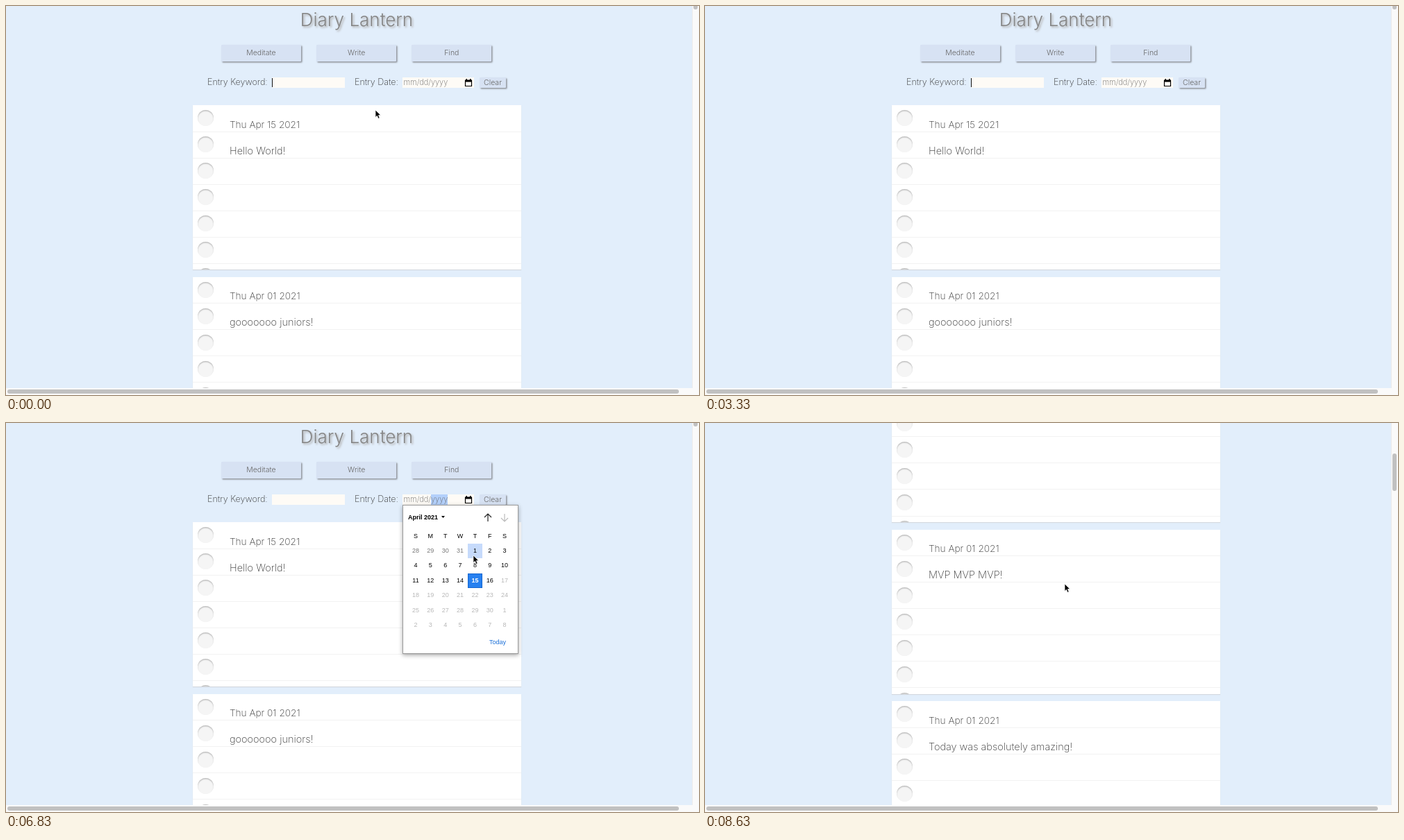
An HTML page that plays this animation: 998 px wide and 561 px high, repeating every 8680 ms.

```html
<!DOCTYPE html>
<html lang="en">
<head>
<meta charset="utf-8">
<title>Diary Lantern</title>
<style>
html, body { margin: 0; width: 100%; height: 100%; overflow: hidden; }
body { position: relative; background: #fafafa; font: 200 14.5px/20px Inter, "Open Sans", sans-serif; color: #333; }
div, svg { position: absolute; box-sizing: border-box; }
.t { white-space: pre; }
.mid { transform: translateX(-50%); }
#view { width: 988px; height: 551px; overflow: hidden; background: #e2eefb; }
#page { width: 988px; height: 2000px; }
.title { font-size: 26px; font-weight: 300; color: #858585; text-shadow: 2px 2px 3px #b0b0b0; }
.btn { background: #d7e2f3; border-radius: 1px; box-shadow: 1.5px 1.5px 2px #8b8f96; font-size: 10.5px; font-weight: 300; color: #666; text-align: center; }
.label { font-size: 12.6px; color: #333; }
.day { font-size: 13.7px; }
.field { background: #fefbf6; height: 15px; top: 103px; font-size: 10.5px; line-height: 15px; color: #666; white-space: pre; }
#date { font-size: 11px; }
#date span { display: inline-block; background: #b3d0fb; }
#caret { display: inline-block; width: 1px; height: 13px; margin-top: 1px; background: #111; vertical-align: top; }
.card { left: 269px; width: 473px; height: 237px; background: #fff; overflow: hidden; }
.shade { left: 269px; width: 473px; height: 237px; box-shadow: 0 1px 1px #d3d8df; }
.rule { width: 473px; height: 1px; background: #f2f2f2; }
.hole { left: 7px; width: 23px; height: 23px; border-radius: 50%; background: #f5f5f5; box-shadow: inset 0 1.5px 1.5px #bdbdbd; }
.bar { background: #c1c1c1; border-radius: 3px; }
#track { left: 988px; width: 10px; height: 551px; border-left: 1px solid #ececec; overflow: hidden; }
#picker { left: 571px; top: 118px; width: 167px; height: 215px; background: #fff; border: 1px solid #9a9a9a; box-shadow: 0 2px 6px #0005; font: 9px/20px "Liberation Sans", Arial, sans-serif; color: #000; }
.cell { width: 21.4px; height: 21.4px; line-height: 21.4px; text-align: center; }
.old { color: #777; }
.off { color: #b8b8b8; }
.today { background: #2680f0; outline: 1px solid #1667cf; outline-offset: -1px; color: #fff; font-weight: bold; }
.hover { background: #c6dafb; }
</style>
</head>
<body>
<div id="view">
  <div id="page"></div>
  <div id="picker">
    <svg width="165" height="40" fill="none" stroke-width="1.2">
      <path d="M55 15h5l-2.500 3z" fill="#000"/>
      <path d="M122 23v-11m-5 5l5-5l5 5" stroke="#222"/>
      <path d="M146 12v11m-5-5l5 5l5-5" stroke="#bbb"/>
    </svg>
  </div>
</div>
<div id="track"><div id="thumb" class="bar" style="left:1px;width:6px"></div></div>
<div class="bar" style="left:2px;top:553px;width:967px;height:6px"></div>
<svg id="cursor" width="16" height="20" stroke-linejoin="round" style="overflow:visible">
  <path id="arrow" d="M0 0v10.500l2.400-2.200l1.700 4l2-.8l-1.700-3.900h3.300z" fill="#000" stroke="#fff" stroke-width=".7"/>
  <path id="beam" d="M-2.500-7q2.500 0 2.500 1.500v11q0 1.500-2.500 1.500M2.500-7q-2.500 0-2.500 1.500M0 5.500q0 1.500 2.500 1.500" fill="none" stroke="#333"/>
  <path id="hand" d="M-1.500 6V1q0-1.200 1-1.200t1 1.200v3.200q1.700-.8 2.200.5q1.600-.5 2 .7q1.800-.3 1.800 1.300q0 3-1.500 5.300h-5q-1-2-3.200-4.300q-.9-1.400.3-1.600z" fill="#fff" stroke="#222"/>
</svg>
<script>
const LOOP = 8680, GAP = 247.8, ROW = 38.05;
const $ = id => document.getElementById(id);

function box(parent, cls, style, text = '') {
  const el = document.createElement('div');
  el.className = cls;
  for (const k in style) el.style[k] = typeof style[k] === 'number' ? style[k] + 'px' : style[k];
  el.textContent = text;
  parent.append(el);
  return el;
}
// Text whose capitals are centred on y
const write = (parent, x, y, text, cls = '') => box(parent, 't ' + cls, {left: x, top: y - 10}, text);

const page = $('page'), picker = $('picker');
write(page, 505, 19.5, 'Diary Lantern', 'title mid');
['Meditate', 'Write', 'Find'].forEach((name, i) =>
  box(page, 'btn', {left: 310 + 137.2 * i, top: 56, width: 115, height: 23.5, lineHeight: '24px'}, name));
write(page, 290, 110, 'Entry Keyword:', 'label');
write(page, 502, 110, 'Entry Date:', 'label');
const keyword = box(page, 'field', {left: 382.500, width: 105});
keyword.innerHTML = '<i id="word" style="font-style:normal"></i><i id="caret"></i>';
const date = box(page, 'field', {left: 571, width: 103, paddingLeft: 1.5});
date.id = 'date';
page.insertAdjacentHTML('beforeend', `<svg style="left:660px;top:105px" width="12" height="12">
  <path d="M1.500 2.500h9v8h-9z" fill="none" stroke="#000" stroke-width="1.200"/><path d="M1 1.500h10v3H1zM2.500 0h1.500v2H2.500zM8 0h1.500v2H8z"/></svg>`);
box(page, 'btn', {left: 682, top: 103, width: 38, height: 15, lineHeight: '16px'}, 'Clear');

function card(list, i, day, text) {
  const top = 143 + GAP * i;
  const wrap = box(list, '', {});
  box(wrap, 'shade', {top});
  const el = box(wrap, 'card', {top});
  for (let r = 0; r < 7; r++) {
    box(el, 'hole', {top: 7 + ROW * r});
    box(el, 'rule', {top: 37.500 + ROW * r});
  }
  write(el, 53, 27.500, day, 'day');
  write(el, 53, 65.500, text);
  return wrap;
}
const all = box(page, '', {}), found = box(page, '', {});
card(all, 0, 'Thu Apr 15 2021', 'Hello World!');
const second = card(all, 1, 'Thu Apr 01 2021', 'gooooooo juniors!');
['ahidhiauhdaishdiuahdsiuhaihdiuahihi', "Let's boogy", 'MVP MVP MVP!', 'Today was absolutely amazing!']
  .forEach((text, i) => card(found, i, 'Thu Apr 01 2021', text));

write(picker, 7, 16.500, 'April 2021').style.fontWeight = 'bold';
write(picker, 136, 196.500, 'Today', 'mid').style.color = '#1a6fd8';
const cell = (col, row, text, cls) =>
  box(picker, 'cell ' + cls, {left: 7.300 + 21.35 * col, top: 33.500 + 21.4 * row}, text);
[...'SMTWTFS'].forEach((d, i) => cell(i, 0, d, ''));
let first;
for (let i = 0; i < 42; i++) {
  const n = i - 3;
  const cls = n < 1 ? 'old' : n > 16 ? 'off' : n === 15 ? 'today' : '';
  const el = cell(i % 7, 1 + (i / 7 | 0), n < 1 ? n + 31 : n > 30 ? n - 30 : n, cls);
  if (n === 1) first = el;
}

// Pointer path: time, x, y, shape
const path = [
  [0, 532, 150, 'arrow'], [80, 532, 150, 'arrow'], [280, 465, 121, 'beam'], [430, 450, 118, 'beam'],
  [980, 450, 118, ''], [3780, 450, 118, ''], [3830, 450, 118, 'beam'], [3980, 490, 110, 'arrow'],
  [4430, 627, 110, 'arrow'], [4630, 634, 107, 'hand'], [4730, 634, 107, 'hand'], [4780, 644.500, 107, 'hand'],
  [4980, 644.500, 107, 'hand'], [5180, 664, 107, 'hand'], [5630, 664, 107, 'arrow'], [5780, 664, 108, 'arrow'],
  [6480, 677, 184, 'arrow'], [6830, 673, 191, 'arrow'], [7080, 674, 190, 'arrow'], [7430, 680, 188, 'arrow'],
  [7980, 631, 207, 'arrow'], [8130, 583, 217, 'arrow'], [8230, 583, 217, 'arrow'], [8630, 518, 232, 'arrow'], [LOOP, 518, 232, 'arrow']
];
const keys = [[0, ''], [980, 'H'], [1380, 'He'], [1480, 'Hel'], [3030, 'He'], [3130, 'H'], [3230, '']];
const clamp = v => Math.max(0, Math.min(1, v));
const ease = v => v * v * (3 - 2 * v);
const show = (el, on) => { el.style.display = on ? '' : 'none'; };

function draw(t) {
  const i = path.findLastIndex(p => p[0] <= t);
  const a = path[i], b = path[i + 1] || a;
  const k = clamp((t - a[0]) / (b[0] - a[0] || 1));
  const x = a[1] + (b[1] - a[1]) * k, y = a[2] + (b[2] - a[2]) * k;
  $('cursor').style.transform = `translate(${x}px,${y}px)`;
  for (const id of ['arrow', 'beam', 'hand']) show($(id), a[3] === id);

  const word = keys.findLast(p => p[0] <= t)[1];
  $('word').textContent = word;
  $('word').style.marginLeft = word ? '1px' : '0';
  $('caret').style.visibility = t < 330 || t >= 830 && t < 3830 ? '' : 'hidden';

  const picked = t >= 7080, filtered = word.length > 1;
  const html = picked ? '04/01/<span>2021</span>' : t < 4430 ? 'mm/dd/yyyy' : 'mm/dd/<span>yyyy</span>';
  if (date.innerHTML !== html) date.innerHTML = html;
  show(picker, t >= 5630 && !picked);
  first.classList.toggle('hover', y > 173 && y < 195);
  show(all, !picked);
  show(found, picked);
  show(second, !filtered);

  const scroll = ease(clamp((t - 8230) / 400));
  page.style.transform = `translateY(${-485 * scroll}px)`;
  $('thumb').style.top = -6 + 50 * scroll + 'px';
  $('thumb').style.height = (picked ? 54 : filtered ? 528 : 11) + 'px';
}

function frame(now) {
  const t = now % LOOP;
  draw(t < 30 ? 0 : 30 + Math.floor((t - 30) / 50) * 50);
  requestAnimationFrame(frame);
}
draw(0);
requestAnimationFrame(frame);
</script>
</body>
</html>
```
